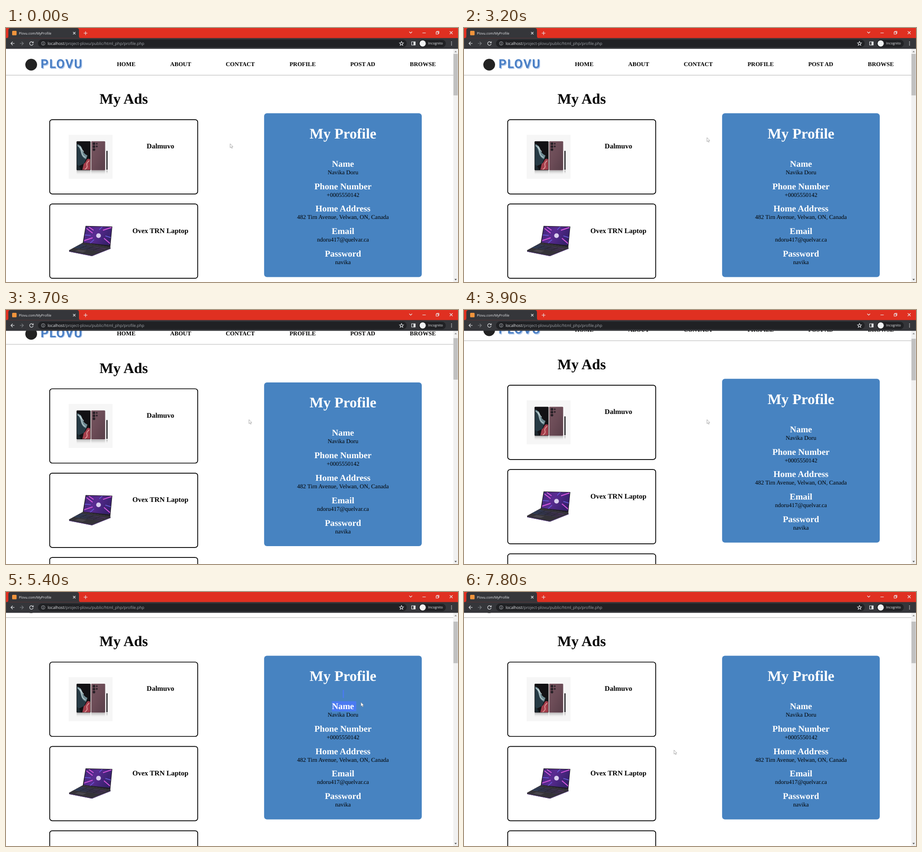
Recreate the animation shown at these times as an HTML page. Size 960x540 px, loop 8000 ms.

```html
<!DOCTYPE html>
<html lang="en">
<head>
<meta charset="utf-8">
<title>My profile</title>
<style>
  html, body { margin: 0; width: 100%; height: 100%; overflow: hidden; background: #fff; }
  svg { display: block; width: 960px; height: 540px; text-rendering: geometricPrecision; }
  .page { font: bold 12.5px "Liberation Serif", "Times New Roman", serif; text-anchor: middle; }
  .title { font-size: 31.1px; }
  .item { font-size: 15px; }
  .head { font-size: 18.75px; fill: #fff; }
  .value { font-weight: normal; }
  .value.on { fill: #fff; }
  .mark { fill: #4a7af2; visibility: hidden; }
  .mark.on { visibility: visible; }
  .card { fill: #fff; stroke: #000; stroke-width: 1.7; }
  .ui { font: 8.5px "Open Sans", "Noto Sans", sans-serif; fill: #e8eaed; }
  .small { font-size: 7.2px; }
  .brand { font: 700 26px Roboto, Inter, sans-serif; text-anchor: start; letter-spacing: 1.6px; }
  .icon { fill: none; stroke: #e8eaed; stroke-width: 1.1; }
</style>
</head>
<body>
<svg viewBox="0 0 960 540">
  <defs>
    <clipPath id="view"><rect y="44" width="950" height="496"/></clipPath>
    <clipPath id="glass"><rect x="150.8" y="241.6" width="28" height="60" rx="1"/></clipPath>
    <clipPath id="lid"><path d="M170 422 224.8 423 220.5 462 165 456z"/></clipPath>
    <linearGradient id="back" x2="1" y2="1">
      <stop stop-color="#775660"/><stop offset=".5" stop-color="#6b4b56"/><stop offset="1" stop-color="#573e48"/>
    </linearGradient>
    <linearGradient id="mirror" x2="0" y2="1">
      <stop stop-color="#777" stop-opacity=".5"/><stop offset="1" stop-color="#ddd" stop-opacity="0"/>
    </linearGradient>
    <linearGradient id="neon" x2="1" y2=".4">
      <stop stop-color="#35266f"/><stop offset=".5" stop-color="#5a2b92"/><stop offset="1" stop-color="#35206a"/>
    </linearGradient>
    <linearGradient id="keys" x2="1">
      <stop stop-color="#2f4565"/><stop offset=".5" stop-color="#37324c"/><stop offset="1" stop-color="#4a3158"/>
    </linearGradient>
  </defs>

  <rect width="960" height="540" fill="#fff"/>

  <g clip-path="url(#view)">
    <g class="page" id="page">
      <circle cx="53.5" cy="78" r="12.5" fill="#222"/>
      <g class="brand">
        <text x="75" y="86.8" fill="#b3caeb">PLOVU</text>
        <text x="73.5" y="85.3" fill="#4b80c6">PLOVU</text>
      </g>
      <g id="nav"></g>
      <path d="M0 100.3H950" stroke="#b5b5b5"/>
      <text class="title" x="250" y="161.3">My Ads</text>

      <rect class="card" x="92.8" y="194.8" width="314.4" height="158" rx="5.5"/>
      <rect class="card" x="92.8" y="374.1" width="314.4" height="158" rx="5.5"/>
      <rect class="card" x="92.8" y="553.4" width="314.4" height="158" rx="5.5"/>
      <text class="item" x="328" y="256.2">Dalmuvo</text>
      <text class="item" x="328" y="435.5">Ovex TRN Laptop</text>

      <g id="phone">
        <rect x="133" y="227" width="93.3" height="93.5" fill="#f6f6f6"/>
        <path d="M150 303h29.5v9H150zM181 303h29.5v9H181zM213 303h3v6h-3z" fill="url(#mirror)"/>
        <rect x="149.8" y="240.8" width="29.8" height="61.6" rx="1.5" fill="#121114"/>
        <g clip-path="url(#glass)">
          <path d="M150 246q9 3 12 13t10 15l-6 14-16 8z" fill="#263a44"/>
          <path d="M151 247q9 2 11 11t11 13l-3 8q-9-4-11-14t-8-18z" fill="#6d8a92"/>
          <path d="M152 250q8 5 9 14t8 11M157 251q4 8 8 12" fill="none" stroke="#c3d3d6" stroke-width="1.4"/>
          <path d="M179 279q-6-3-8 2t-6 8l-3 13h17z" fill="#a33e4b"/>
          <path d="M177 282q-7 5-5 10t-5 9" fill="none" stroke="#dc9597" stroke-width="1.8"/>
          <path d="M150 290q7 2 9 12h-9z" fill="#1b272d"/>
        </g>
        <rect x="180.8" y="240.8" width="29.8" height="61.6" rx="1.5" fill="url(#back)"/>
        <path d="M181.3 241v61" stroke="#b0959a" stroke-width=".7"/>
        <g fill="#211c22" stroke="#49363e" stroke-width=".6">
          <circle cx="186.8" cy="246" r="2.7"/><circle cx="186.8" cy="252.3" r="2.7"/>
          <circle cx="186.8" cy="258.6" r="2.7"/><circle cx="192.8" cy="246" r="1.6"/>
          <circle cx="192.8" cy="251.8" r="1.8"/>
        </g>
        <rect x="213.2" y="261" width="2.5" height="40.5" rx="1" fill="#1c1a1d"/>
      </g>

      <g id="laptop">
        <path d="M169 420.8 225.8 422 221.5 466 163 457z" fill="#211d27"/>
        <g clip-path="url(#lid)">
          <path d="M160 418h68v48h-68z" fill="url(#neon)"/>
          <path d="M171 426 184 436M176 423 186 430M208 447 222 459M206 430 224 424M166 452 184 446" stroke="#d857dd" stroke-width="1.9"/>
          <path d="M167 440 180 441M211 442 224 446M198 429 205 422M178 458 187 450" stroke="#6a5fe0" stroke-width="1.5"/>
        </g>
        <circle cx="196.5" cy="441.5" r="5" fill="#d9cdee"/>
        <path d="M163 456.5 221.5 465.5 222.3 469 183 485 134.2 475.5 133.8 472.5z" fill="#343238"/>
        <path d="M159 460 214 468.5 198 475 144.5 467z" fill="url(#keys)"/>
        <path d="M154 462.5 208 471M149 465 202 473.5M172 462 157 469M186 464 171 471M200 466.5 185 473" stroke="#28262c" stroke-width=".9"/>
        <path d="M154 470.8 171 473.5 163 477.3 146 474.2z" fill="#48454c"/>
        <path d="M134 475 182 484.6 222 469" fill="none" stroke="#5c3a8c" stroke-width=".9"/>
      </g>

      <rect x="548.2" y="181.2" width="334.8" height="348.2" rx="6" fill="#4783c1"/>
      <text class="title" x="715.7" y="234.7" fill="#fff">My Profile</text>
      <g id="marks"></g>
      <g id="fields"></g>
    </g>
  </g>

  <rect x="950" y="44" width="10" height="496" fill="#f1f1f1"/>
  <rect id="thumb" x="950.3" y="55" width="9.2" height="88.3" fill="#c1c1c1"/>
  <path d="M952.5 51.5h5l-2.5-3z" fill="#8a8a8a"/>
  <path d="M952.5 533.5h5l-2.5 3z" fill="#505050"/>

  <g class="ui">
    <rect width="960" height="22" fill="#e03021"/>
    <path d="M1 21.5q4 0 4-4V5q0-5 5-5h140q5 0 5 5v12.5q0 4 4 4z" fill="#35363a"/>
    <rect y="21.4" width="960" height="22.9" fill="#35363a"/>
    <rect x="13" y="6" width="9.5" height="9.5" rx="1.5" fill="#f0943c"/>
    <text class="small" x="27.3" y="13.5">Plovu.com/MyProfile</text>
    <path class="icon" d="M142.5 8.5l5 5m0-5l-5 5M165 11h8m-4-4v8"/>
    <g class="icon">
      <path d="M856.5 8l3 3 3-3M884.5 10.5h7M942.5 7l6 6m0-6l-6 6"/>
      <path d="M913.5 8.5h4.5v4.5h-4.5zM915 8.5v-1.5h4.5v4.5H918"/>
    </g>

    <rect x="68" y="24.5" width="783" height="16.5" rx="8.25" fill="#202124"/>
    <path class="icon" d="M18 32.8h-7.5m3.7-3.7-3.7 3.7 3.7 3.7"/>
    <path class="icon" style="stroke:#7f8286" d="M29.5 32.8H37m-3.7-3.7 3.7 3.7-3.7 3.7"/>
    <path class="icon" d="M57 30.5a3.8 3.8 0 1 0 .8 3M58 28.5v3h-3"/>
    <circle class="icon" style="stroke:#bdc1c6;stroke-width:.8" cx="79" cy="32.8" r="3.8"/>
    <path class="icon" style="stroke:#bdc1c6" d="M79 32.2v2.8M79 30.3v1"/>
    <text x="88.3" y="36">localhost<tspan fill="#a4a8ad">/project-plovu/public/html_php/profile.php</tspan></text>
    <path class="icon" d="M840 28.6l1.2 2.9 3.1.2-2.4 2 .8 3.1-2.7-1.7-2.7 1.7.8-3.1-2.4-2 3.1-.2z"/>
    <path class="icon" d="M861.5 29.3h7.5v7h-7.5z"/>
    <path d="M865.5 29h4v7.6h-4z"/>
    <rect x="876.5" y="25" width="57.5" height="16" rx="8" fill="#202124"/>
    <circle cx="885" cy="32.8" r="6.6" fill="#f1f3f4"/>
    <text class="small" x="896.6" y="35.4">Incognito</text>
    <circle cx="946.3" cy="29.7" r=".9"/><circle cx="946.3" cy="32.8" r=".9"/><circle cx="946.3" cy="35.9" r=".9"/>
  </g>

  <path id="cursor" d="M0 0V8.6L2 6.8 3.4 9.8 4.8 9.2 3.5 6.3H6.1z" fill="#fff" stroke="#777" stroke-width=".6"/>
</svg>

<script>
const LOOP = 8000, STEP = 100;
const CENTER = 715.7;
const $ = id => document.getElementById(id);

function add(parent, tag, attrs, text = '') {
  const el = document.createElementNS('http://www.w3.org/2000/svg', tag);
  for (const k in attrs) el.setAttribute(k, attrs[k]);
  el.textContent = text;
  return parent.appendChild(el);
}

[['HOME', 255.2], ['ABOUT', 371], ['CONTACT', 497.5], ['PROFILE', 630], ['POST AD', 757.7], ['BROWSE', 885.3]]
  .forEach(([label, x]) => add($('nav'), 'text', { x, y: 81.2 }, label));

// Each selectable part lights up once the drag passes its top edge.
const parts = [];
function addMark(x, y, width, height, label) {
  const mark = add($('marks'), 'rect', { class: 'mark', x, y, width, height });
  parts.push({ top: y, els: label ? [mark, label] : [mark] });
}
function addLine(cls, text, top, size, tail) {
  const label = add($('fields'), 'text', { class: cls, x: CENTER, y: top + size * 0.891 }, text);
  const width = label.getComputedTextLength();
  addMark(CENTER - width / 2, top, width + tail, size * 1.15, label);
}

[['Name', 'Navika Doru'],
 ['Phone Number', '+0005550142'],
 ['Home Address', '482 Tirn Avenue, Velwan, ON, Canada'],
 ['Email', 'ndoru417@quelvar.ca'],
 ['Password', 'navika']
].forEach(([head, value], i) => {
  const top = 278 + 47.85 * i;
  addMark(CENTER - 0.5, i ? top - 11 : 254, 2.5, i ? 11 : 17);
  addLine('head', head, top, 18.75, 4.7);
  addLine('value', value, top + 21.6, 12.5, i < 4 ? 3.1 : 0);
});

const scrollKeys = [[3300, 0], [3400, 8], [3500, 16.2], [3700, 27.3], [3900, 35], [4200, 45.8]];
const cursorKeys = [
  [2900, 476, 246], [3200, 516, 233], [4900, 516, 233], [5100, 751, 200], [5300, 751, 200],
  [6100, 774, 475], [6200, 774, 476], [6600, 790, 440], [7000, 790, 440], [7600, 446, 336]
];

function sample(keys, t) {
  const i = keys.findIndex(k => k[0] > t);
  if (i === 0) return keys[0].slice(1);
  if (i < 0) return keys[keys.length - 1].slice(1);
  const a = keys[i - 1], b = keys[i], u = (t - a[0]) / (b[0] - a[0]);
  return a.slice(1).map((v, n) => v + (b[n + 1] - v) * u);
}

function draw(now) {
  const t = Math.floor(now % LOOP / STEP) * STEP;
  const [scroll] = sample(scrollKeys, t);
  const [x, y] = sample(cursorKeys, t);
  const dragging = t >= 5400 && t < 6200;
  $('page').setAttribute('transform', `translate(0 ${-scroll})`);
  $('thumb').setAttribute('y', 55 + scroll * 0.175);
  $('cursor').setAttribute('transform', `translate(${x} ${y})`);
  for (const { top, els } of parts) {
    const on = dragging && y >= top - scroll;
    els.forEach(el => el.classList.toggle('on', on));
  }
}

const start = performance.now();
function tick() {
  draw(performance.now() - start);
  requestAnimationFrame(tick);
}
tick();
</script>
</body>
</html>
```
